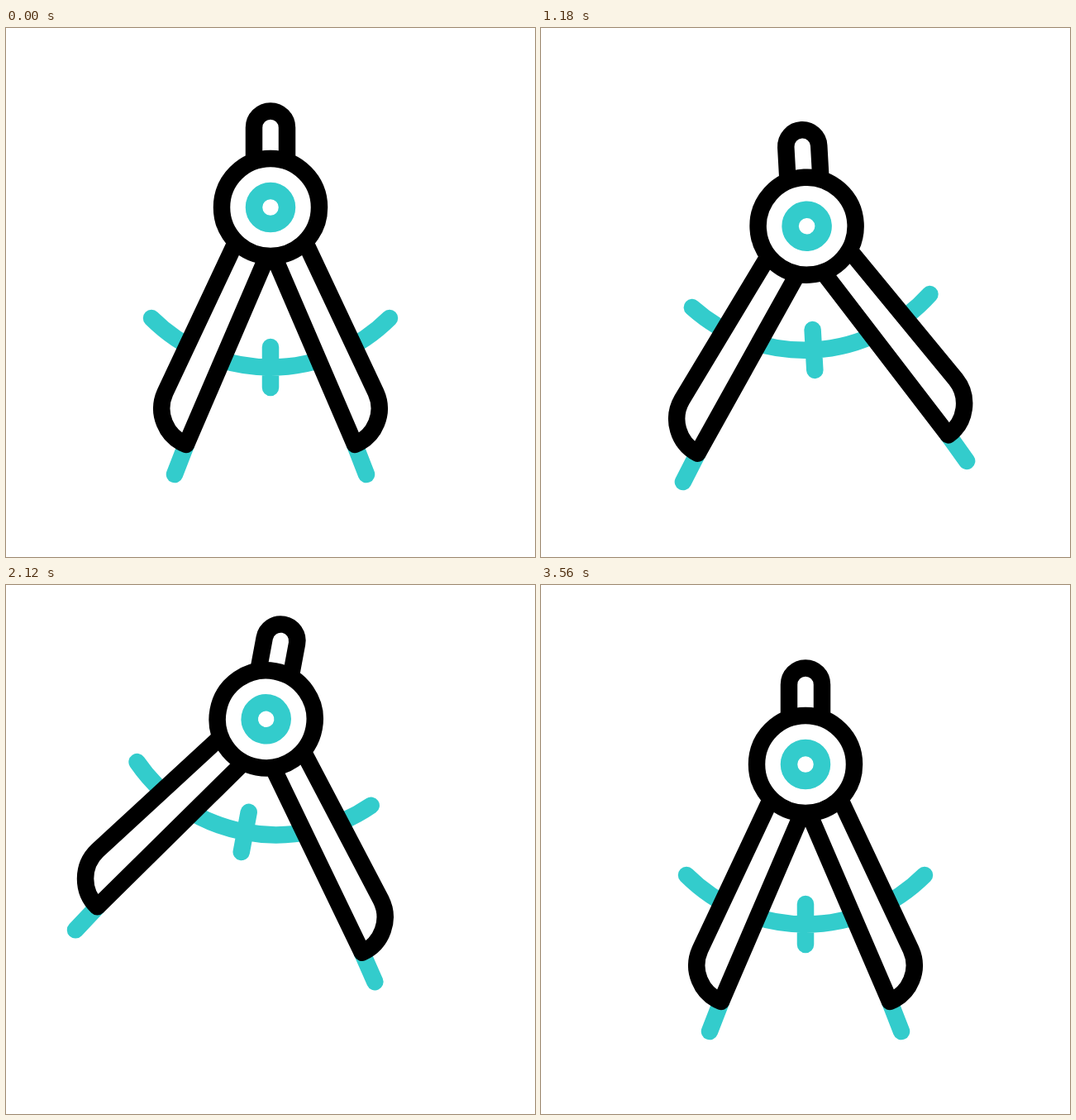
An HTML page for the animation above (3600 ms loop, 640 by 640 pixels).

```html
<!DOCTYPE html>
<html lang="en">
<head>
<meta charset="utf-8">
<title>Drawing compass</title>
<style>
html, body { margin: 0; width: 100%; height: 100%; overflow: hidden; background: #fff; }
svg { display: block; width: 100vw; height: 100vh; }
.ink, .teal { fill: none; stroke-width: 20.5; stroke-linecap: round; stroke-linejoin: round; }
.ink { stroke: #000; fill: #fff; }
.teal { stroke: #33cccc; }
</style>
</head>
<body>
<svg viewBox="0 0 640 640">
  <defs>
    <g id="leg">
      <path class="teal" d="M-102 287L-116 323"/>
      <path class="ink" d="M-40 38L-127.5 224A47 47 0 0 0 -102 287L-4.5 60"/>
    </g>
  </defs>
  <path id="trail" class="teal" d="M547 503A128 128 0 0 1 341 581"/>
  <g id="body">
    <path id="scale" class="teal" d="M-144 134A204 204 0 0 0 144 134M0 169V218"/>
    <use id="left" href="#leg"/>
    <use id="right" href="#leg"/>
    <path class="ink" d="M-20 -55V-96.5A20 20 0 0 1 20 -96.5V-55"/>
    <circle class="ink" r="59"/>
    <circle class="teal" r="20"/>
  </g>
</svg>
<script>
const LOOP = 3600;
const $ = id => document.getElementById(id);
const place = (id, value) => $(id).setAttribute('transform', value);

// Progress from 0 to 1 between two times, easing in and out.
const ease = (t, start, end) => {
  const u = Math.min(1, Math.max(0, (t - start) / (end - start)));
  return (1 - Math.cos(Math.PI * u)) / 2;
};

// Sum of eased moves, each given as [start, end, amount].
const moves = (t, ...list) =>
  list.reduce((sum, [start, end, amount]) => sum + amount * ease(t, start, end), 0);

const trail = $('trail'), trailLength = trail.getTotalLength();

function draw(t) {
  // Hop, land, hop again, settle.
  const lift = moves(t, [190, 700, -55], [700, 1200, 78], [1500, 2010, -78], [2010, 3440, 55]);
  const tilt = moves(t, [260, 810, 6.2], [810, 1220, -9.6], [1575, 2220, 14.8], [2440, 3540, -11.4]);
  // Legs spread, close while drawing, spread again; skew makes them uneven.
  const spread = moves(t, [200, 797, 16], [797, 1240, -6.2], [1240, 1600, -18.8],
    [1600, 2290, 24.8], [2680, 3560, -15.8]);
  const skew = moves(t, [800, 1760, 2.95], [1760, 2300, -2.95]);

  place('body', `translate(320 ${188 + lift}) rotate(${tilt}) translate(0 29)`);
  place('scale', `translate(0 ${-4.6 * (spread - 0.62 * skew)})`);
  place('left', `rotate(${spread - skew} 0 -8)`);
  place('right', `scale(-1 1) rotate(${spread + skew} 0 -8)`);

  const from = ease(t, 1300, 1800) * trailLength, to = ease(t, 1185, 1420) * trailLength;
  trail.style.visibility = to > from ? 'visible' : 'hidden';
  trail.style.strokeDasharray = `${to - from} 1000`;
  trail.style.strokeDashoffset = -from;
}

function tick() {
  draw(performance.now() % LOOP);
  requestAnimationFrame(tick);
}
tick();
</script>
</body>
</html>
```
